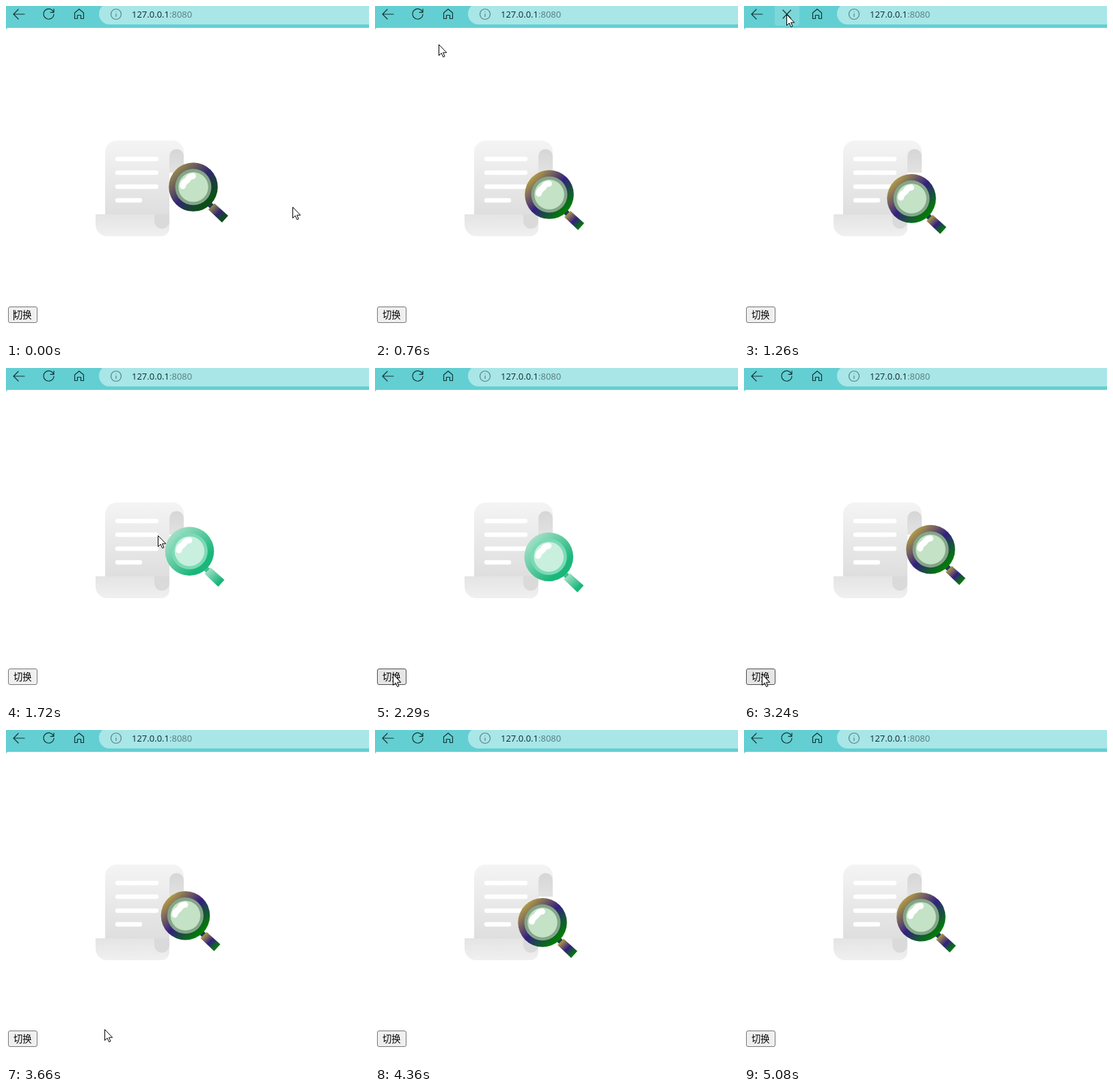
An HTML page for the animation above (5130 ms loop, 531 by 489 pixels).

```html
<!DOCTYPE html>
<html lang="zh">
<head>
<meta charset="utf-8">
<style>
  html, body { margin: 0; width: 100%; height: 100%; overflow: hidden; background: #fff; }
  svg { display: block; }
  .icon { fill: none; stroke: #173335; stroke-width: 1.2; stroke-linecap: round; stroke-linejoin: round; }
  .url { font: 13px "Open Sans", "Noto Sans", sans-serif; fill: #10292b; }
  .label { font: 13.33px "Noto Sans CJK SC", "Noto Sans CJK", sans-serif; fill: #000; }
</style>
</head>
<body>
<svg width="531" height="489" viewBox="0 0 531 489">
  <defs>
    <linearGradient id="paper" x2="0" y2="1">
      <stop stop-color="#f4f4f4"/><stop offset="1" stop-color="#dcdcdc"/>
    </linearGradient>
    <linearGradient id="roll" x2="0" y2="1">
      <stop stop-color="#e4e4e4"/><stop offset="1" stop-color="#f0f0f0"/>
    </linearGradient>
    <linearGradient id="fold" x2="0" y2="1">
      <stop stop-color="#d6d6d6"/><stop offset="1" stop-color="#e2e2e2"/>
    </linearGradient>
    <linearGradient id="dark" x2="1" y2="1">
      <stop offset=".1" stop-color="#c2ac3e"/><stop offset=".5" stop-color="#33207f"/><stop offset=".84" stop-color="#008000"/>
    </linearGradient>
    <linearGradient id="muted" x2="1" y2="1">
      <stop offset=".1" stop-color="#a2944a"/><stop offset=".5" stop-color="#322870"/><stop offset=".8" stop-color="#0a5014"/>
    </linearGradient>
    <linearGradient id="green" x2="1" y2="1">
      <stop offset=".08" stop-color="#b0e4cf"/><stop offset=".75" stop-color="#1ab67a"/>
    </linearGradient>
  </defs>

  <!-- browser bar -->
  <rect width="531" height="36" fill="#63cfd2"/>
  <path d="M0 489V36a4 4 0 0 1 4-4H531V489z" fill="#fff"/>
  <rect x="136" y="-4" width="420" height="31" rx="15.5" fill="#a8e6e7"/>
  <rect id="reloadHover" x="45" y="-3" width="36" height="32" rx="4" fill="#7dd7d9"/>
  <g class="icon">
    <path d="M27 12H11.500M18 5L11 12L18 19"/>
    <path id="reload" d="M69.500 9A7.500 7.500 0 1 0 70 12M70 4.500V9.300H65"/>
    <path id="stop" d="M57 6L68.500 18M68.500 6L57 18"/>
    <path d="M100.500 10L107 4.500L113.500 10V18.500H109.500V13.500H104.500V18.500H100.500z"/>
    <g stroke="#5d8284"><circle cx="161" cy="12" r="7.500"/><path d="M161 11.500V15.500M161 8.500V8.600"/></g>
  </g>
  <text class="url" x="184" y="17">127.0.0.1<tspan fill="#587b7d">:8080</tspan></text>

  <!-- document -->
  <path d="M145 306V214a17 17 0 0 1 17-17H244a16 16 0 0 1 16 16V244H239V316H145z" fill="url(#paper)"/>
  <path d="M239 244V220a10.500 10.500 0 0 1 21 0V244z" fill="url(#fold)"/>
  <path d="M131 305H217L239 316V325a12 12 0 0 1-12 12H148a17 17 0 0 1-17-17z" fill="url(#roll)"/>
  <path d="M217 305H239V315a11 11 0 0 1-22 0z" fill="#dadada"/>
  <path d="M163 224H220M163 244H220M163 264.500H220M163 284.500H196" stroke="#fff" stroke-width="6.400" stroke-linecap="round"/>

  <!-- magnifier, centred on its lens -->
  <g id="glass">
    <g id="frame">
      <path d="M24 20L31 27L25 32L18 25z"/>
      <path d="M31 24L51 42L42 52L22 33z"/>
      <circle r="35.800"/>
    </g>
    <circle id="rim" r="26.500"/>
    <circle id="lens" r="21.800"/>
    <path d="M-15.500 -1.500C-14.500-9-10-7-8-11.500C-6-15-4-16-.5-16" fill="none" stroke="#fff" stroke-width="9" stroke-linecap="round"/>
  </g>

  <rect id="button" x="3.500" y="440.500" width="42" height="23" rx="2.500"/>
  <text class="label" x="11" y="457">切换</text>
  <path id="caret" d="M11.500 445V460" stroke="#000"/>

  <path id="cursor" d="M.5 .5V16.500L4.200 13L6.700 18.700L9 17.700L6.600 12.200H11.700z" fill="#fff" stroke="#000"/>
</svg>
<script>
const LOOP = 5130;
const el = id => document.getElementById(id);
const show = (id, on) => el(id).style.display = on ? '' : 'none';
const between = (t, a, b) => t >= a && t < b;

// Drift runs: when each appears, and when its slide began
const runs = [
  { from: 0, began: -120, theme: 'dark' },
  { from: 1380, began: 1380, theme: 'green' },
  { from: 3080, began: 3080, theme: 'dark' },
  { from: 5080, began: 4360, theme: 'dark' }
];
const colours = {
  dark: { rim: '#84a688', lens: '#c4e2c6' },
  green: { rim: '#7bdab6', lens: '#c9efde' }
};

// Pointer path: time, x, y
const path = [
  [0, 419, 294], [150, 415, 290], [540, 223, 151], [760, 93, 56], [960, 62, 12],
  [1300, 62, 12], [1500, 140, 85], [1720, 222, 245], [2140, 27, 446],
  [2300, 26, 448], [3350, 26, 448], [3660, 143, 438], [3910, 395, 444], [4150, 533, 488]
];

function pointerAt(t) {
  const i = path.findIndex(p => p[0] > t);
  if (i < 0) return null;
  const [a, b] = [path[i - 1], path[i]];
  const k = (t - a[0]) / (b[0] - a[0]);
  return [a[1] + (b[1] - a[1]) * k, a[2] + (b[2] - a[2]) * k];
}

function draw(t) {
  const run = runs.filter(r => r.from <= t).pop();
  // The page freezes while it reloads
  const clock = between(t, 1160, 1380) ? 1160 : t;
  const slide = (clock - run.began) * 0.025;
  el('glass').setAttribute('transform', `translate(${277 - slide} ${263.3 + slide * 0.58})`);
  el('frame').setAttribute('fill', `url(#${t < 50 ? 'muted' : run.theme})`);
  el('rim').setAttribute('fill', colours[run.theme].rim);
  el('lens').setAttribute('fill', colours[run.theme].lens);

  const loading = between(t, 1250, 1720);
  show('reload', !loading);
  show('stop', loading);
  show('reloadHover', between(t, 940, 1360));
  show('caret', t < 300);

  const hover = between(t, 2120, 3420);
  el('button').setAttribute('fill', hover ? '#e5e5e5' : '#efefef');
  el('button').setAttribute('stroke', hover ? '#4f4f4f' : '#767676');

  const pointer = pointerAt(t);
  show('cursor', pointer);
  if (pointer) el('cursor').setAttribute('transform', `translate(${pointer.map(Math.round)})`);
}

function tick() {
  draw(performance.now() % LOOP);
  requestAnimationFrame(tick);
}
tick();
</script>
</body>
</html>
```
